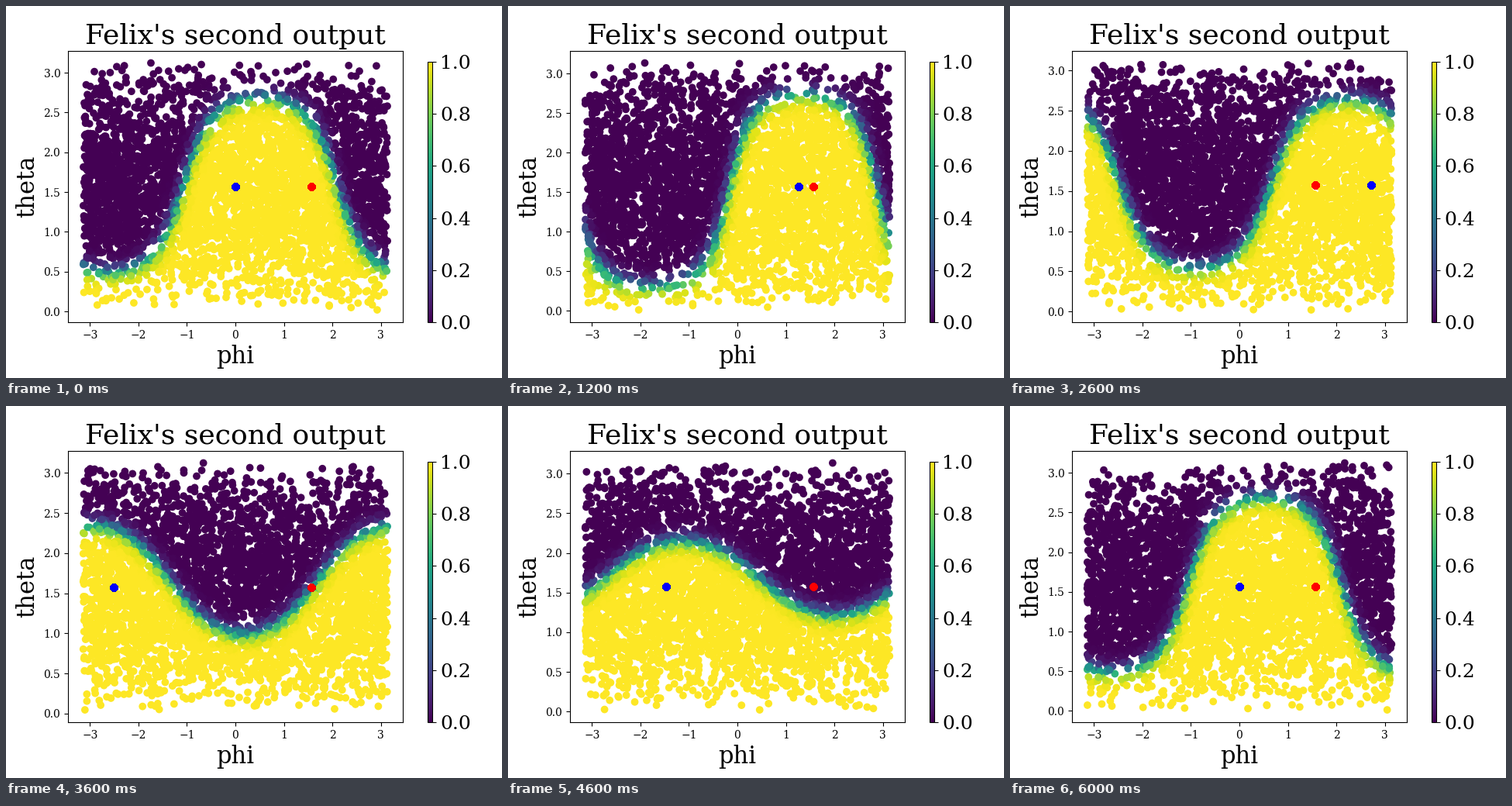
A matplotlib script that plays this animation: 640 by 480 pixels, repeating every 6200 ms.

```python
import numpy as np
import matplotlib.pyplot as plt
from matplotlib.animation import FuncAnimation

STEPS = 31
POINTS = 4000
COPIES = 300  # stacked markers give the two dots a hard edge
GAIN = 20


def sample(step):
    """Random points spread evenly over the sphere."""
    rng = np.random.default_rng(100 + step)
    phi = rng.uniform(-np.pi, np.pi, POINTS)
    theta = np.arccos(rng.uniform(-1, 1, POINTS))
    return phi, theta


def output(phi, theta, angle):
    """Soft step across a plane whose normal swings round with the angle."""
    nx = 0.2 + 1.4 * np.cos(angle) + 0.16 * np.cos(2 * angle - 0.74)
    ny = 0.97 + 1.6 * np.sin(angle) + 0.15 * (np.cos(angle) - np.cos(2 * angle))
    shift = 0.045 + 0.08 * np.cos(angle - 4.5)
    dot = np.cos(theta) + np.sin(theta) * (nx * np.cos(phi) + ny * np.sin(phi))
    side = dot / np.sqrt(1 + nx**2 + ny**2) + shift
    return 1 / (1 + np.exp(-GAIN * side))


def stack(phi):
    return np.tile((phi, np.pi / 2), (COPIES, 1))


plt.rcParams["font.family"] = "DejaVu Serif"
fig, ax = plt.subplots(figsize=(6.4, 4.8), dpi=100)
fig.subplots_adjust(left=0.125, right=0.8, bottom=0.15, top=0.88)

cloud = ax.scatter(*sample(0), c=np.zeros(POINTS), cmap="viridis", vmin=0, vmax=1)
blue = ax.scatter(*stack(0).T, c="blue")
red = ax.scatter(*stack(np.pi / 2).T, c="red")
ax.set_xlim(-1.1 * np.pi, 1.1 * np.pi)
ax.set_title("Felix's second output", fontsize=26)
ax.set_xlabel("phi", fontsize=22)
ax.set_ylabel("theta", fontsize=22)

bar = fig.colorbar(cloud, cax=fig.add_axes([0.85, 0.15, 0.01, 0.7]))
bar.ax.tick_params(labelsize=18)


def update(step):
    angle = 2 * np.pi * step / (STEPS - 1)
    phi, theta = sample(step)
    cloud.set_offsets(np.column_stack((phi, theta)))
    cloud.set_array(output(phi, theta, angle))
    blue.set_offsets(stack((angle + np.pi) % (2 * np.pi) - np.pi))

    margin = 0.05 * np.ptp(theta)
    ax.set_ylim(theta.min() - margin, theta.max() + margin)
    return cloud, blue, red


anim = FuncAnimation(fig, update, frames=STEPS, init_func=lambda: update(0),
                     interval=200, repeat=True, repeat_delay=0)
plt.show()
```
